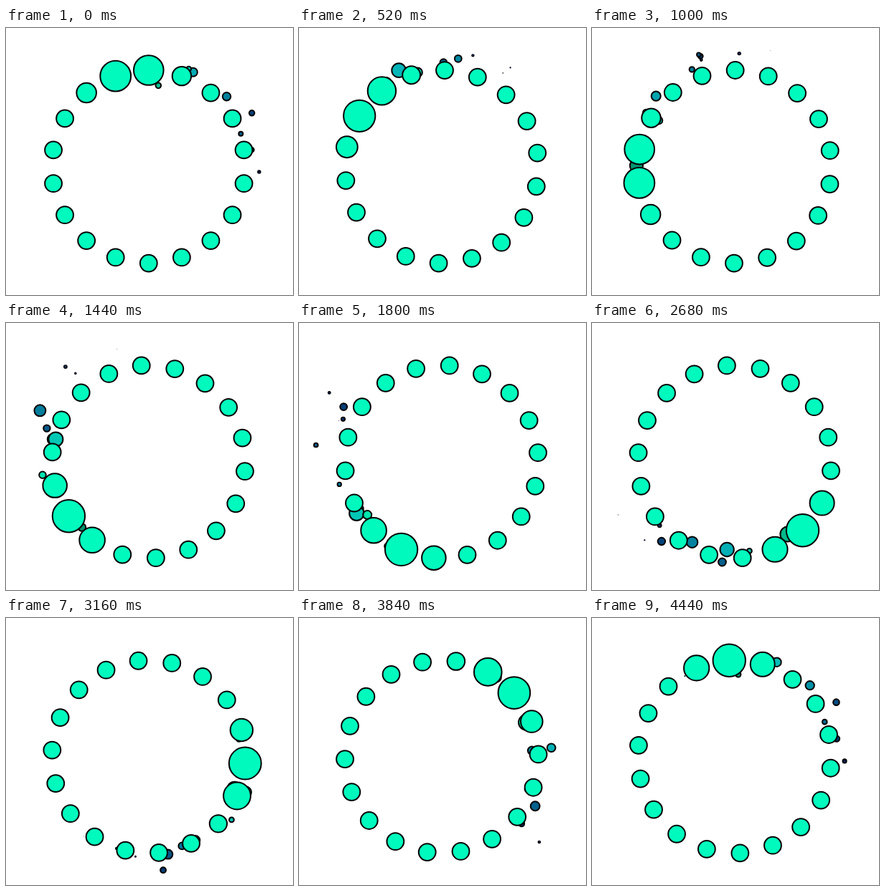
An HTML page with a canvas that plays this animation: 400 by 373 pixels, repeating every 4.48 s.

```html
<!DOCTYPE html>
<html lang="en">
<head>
<meta charset="utf-8">
<title>Ring wave</title>
<style>
  html, body { margin: 0; width: 100%; height: 100%; overflow: hidden; background: #fff; }
  canvas { display: block; width: 400px; height: 373px; }
</style>
</head>
<body>
<canvas id="stage" width="400" height="373"></canvas>
<script>
const ctx = document.getElementById("stage").getContext("2d");
const STEP = 40, STEPS = 112, TURN = 360 / STEPS;
const CX = 198.8, CY = 193.8, RING = 134.8, COUNT = 18;
const LIFE = 28, SPARKS = 50, LEAD = 33;
const GREEN = "rgb(0,250,190)";

const mod = (a, n) => ((a % n) + n) % n;

function randomFrom(seed) {
  return () => {
    seed = (seed + 0x6D2B79F5) | 0;
    let t = Math.imul(seed ^ (seed >>> 15), 1 | seed);
    t = (t + Math.imul(t ^ (t >>> 7), 61 | t)) ^ t;
    return ((t ^ (t >>> 14)) >>> 0) / 4294967296;
  };
}

// Angles run clockwise from the top, in degrees.
function onRing(deg) {
  const a = deg * Math.PI / 180;
  return [CX + RING * Math.sin(a), CY - RING * Math.cos(a)];
}

// The wave runs against the ring and is a little slower than it.
const waveAngle = step => -11 - 3.18 * step;
const travel = age => age - age * age / (2 * LIFE);
const swell = age => Math.sin(Math.PI * Math.pow(age / LIFE, 0.6)) * Math.min(1, age / 4);

// Sparks leave the front of the wave backwards, bent towards the centre.
function makeSparks() {
  const rand = randomFrom(7);
  return Array.from({ length: SPARKS }, (_, i) => {
    const birth = i * STEPS / SPARKS;
    const deg = -11 - TURN * birth - LEAD;
    const [x, y] = onRing(deg);
    const push = rand();
    const speed = 5 + 7 * push;
    const bend = -0.1 + 0.25 * push + 0.45 * rand();
    const dir = deg * Math.PI / 180 + bend;
    return {
      birth, x, y,
      vx: speed * Math.cos(dir),
      vy: speed * Math.sin(dir),
      size: 4.5 + 7.5 * rand()
    };
  });
}

const sparks = makeSparks();

// Dark green brightens to full green, then fades through blue to navy.
function shade(age) {
  const p = age / LIFE, peak = 0.32;
  const q = Math.max(0, (p - peak) / (1 - peak));
  const light = p < peak ? 10 + 36 * p / peak : 46 - 32 * Math.pow(q, 0.75);
  return `hsl(${165 + 75 * q}, ${100 - 25 * q * q}%, ${light}%)`;
}

function disc(x, y, r, fill) {
  const line = Math.min(2, r * 0.5);
  ctx.beginPath();
  ctx.arc(x, y, r - line / 2, 0, 2 * Math.PI);
  ctx.fillStyle = fill;
  ctx.fill();
  ctx.lineWidth = line;
  ctx.strokeStyle = "#000";
  ctx.stroke();
}

function drawSparks(step) {
  sparks
    .map(s => ({ s, age: mod(step - s.birth, STEPS) }))
    .filter(p => p.age < LIFE)
    .sort((a, b) => b.age - a.age)
    .forEach(({ s, age }) => {
      const r = s.size * swell(age);
      if (r < 0.3) return;
      const d = travel(age);
      disc(s.x + s.vx * d, s.y + s.vy * d, r, shade(age));
    });
}

function drawRing(step) {
  const wave = waveAngle(step);
  for (let i = 0; i < COUNT; i++) {
    const deg = i * 360 / COUNT + TURN * step;
    const off = Math.abs(mod(deg - wave + 180, 360) - 180);
    const bump = off < 40 ? 0.5 + 0.5 * Math.cos(Math.PI * off / 40) : 0;
    const [x, y] = onRing(deg);
    disc(x, y, 12.9 + 10.8 * bump, GREEN);
  }
}

function frame(now) {
  const step = Math.floor(now / STEP) % STEPS;
  ctx.fillStyle = "#fff";
  ctx.fillRect(0, 0, 400, 373);
  drawSparks(step);
  drawRing(step);
  requestAnimationFrame(frame);
}
requestAnimationFrame(frame);
</script>
</body>
</html>
```
